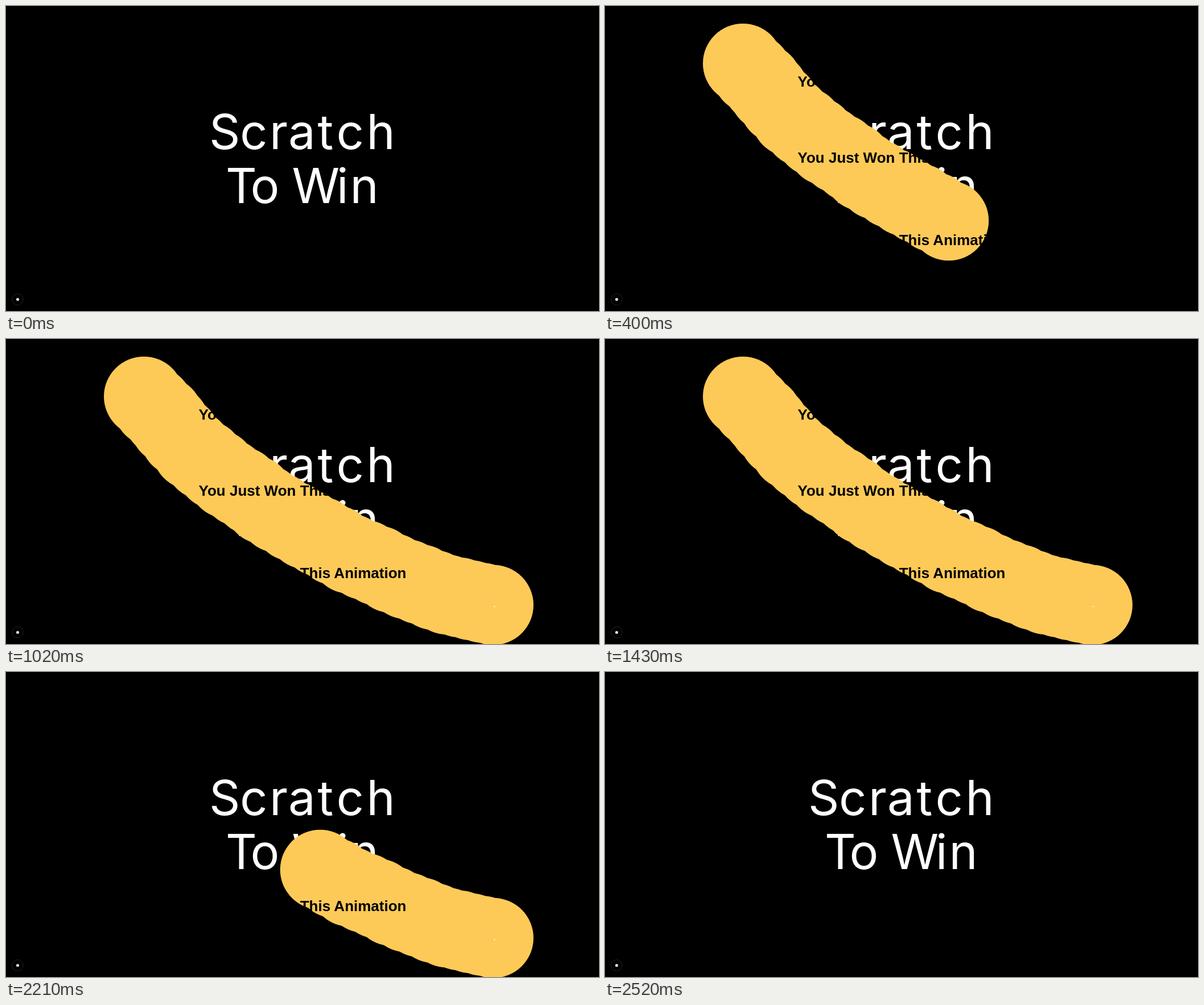
An HTML page without scripts for the animation above (3.27 s loop, 1042 by 537 pixels).

```html
<!DOCTYPE html>
<html lang="en">
<head>
<meta charset="utf-8">
<title>Scratch To Win</title>
<style>
  html, body { margin: 0; width: 100%; height: 100%; overflow: hidden; background: #000; }
  svg { display: block; width: 100%; height: 100%; }

  .title { font: 400 85px Inter, sans-serif; fill: #fff; }
  .prize { font: 700 26px "Liberation Sans", Arial, sans-serif; text-anchor: middle; }

  /* Each stamp shows at its own delay --t and wears off 1850 ms later. */
  .trail > * {
    opacity: 0;
    animation: stamp 3270ms calc(var(--t) * 1ms) infinite;
  }
  .trail circle { r: 70.3px; fill: #fdca58; }
  .trail .cursor { fill: #fff; }
  @keyframes stamp {
    0%, 56.57% { opacity: 1; }
    56.58%, 100% { opacity: 0; }
  }
</style>
</head>
<body>
<svg viewBox="0 0 1042 537">
  <g class="title">
    <text y="251.5" x="357 411 463 496 547.5 580.5 633.5">Scratch</text>
    <text y="347"><tspan x="386 429.5">To</tspan> <tspan x="502.5 581 604.5">Win</tspan></text>
  </g>

  <circle cx="20.5" cy="516.5" r="9.8" fill="#000" stroke="#242424"/>
  <circle cx="20.5" cy="516.5" r="2.6" fill="#ddd"/>

  <g class="trail">
    <circle cx="242.3" cy="101.2" style="--t:88"/>
    <circle cx="259" cy="119" style="--t:140"/>
    <circle cx="276.2" cy="136.3" style="--t:172"/>
    <circle cx="288" cy="151" style="--t:184"/>
    <circle cx="306" cy="172" style="--t:196"/>
    <circle cx="327" cy="195" style="--t:207"/>
    <circle cx="349" cy="213" style="--t:218"/>
    <circle cx="370" cy="230" style="--t:229"/>
    <circle cx="390" cy="246" style="--t:240"/>
    <circle cx="412" cy="260" style="--t:258"/>
    <circle cx="434" cy="275" style="--t:290"/>
    <circle cx="454" cy="291" style="--t:318"/>
    <circle cx="478" cy="306" style="--t:332"/>
    <circle cx="504" cy="321" style="--t:342"/>
    <circle cx="528" cy="335" style="--t:350"/>
    <circle cx="552" cy="348" style="--t:365"/>
    <circle cx="578" cy="363" style="--t:383"/>
    <circle cx="604" cy="378" style="--t:401"/>
    <circle cx="630" cy="389" style="--t:419"/>
    <circle cx="653" cy="399" style="--t:437"/>
    <circle cx="678" cy="412" style="--t:455"/>
    <circle cx="704" cy="423" style="--t:473"/>
    <circle cx="728" cy="432" style="--t:491"/>
    <circle cx="752" cy="442" style="--t:509"/>
    <circle cx="775" cy="450" style="--t:525"/>
    <circle cx="797" cy="455" style="--t:540"/>
    <circle cx="817" cy="460" style="--t:552"/>
    <circle cx="837" cy="464.5" style="--t:585"/>
    <circle cx="854.4" cy="468" style="--t:608"/>
    <circle cx="856.6" cy="468.3" style="--t:640"/>
    <path class="cursor" d="M857.5 468.5v4l2-1z" style="--t:641"/>
  </g>

  <!-- Black on black: readable only where the trail lies behind it. -->
  <g class="prize">
    <text x="521" y="141.5">You Just Won This Animation</text>
    <text x="521" y="276">You Just Won This Animation</text>
    <text x="521" y="420.5">You Just Won This Animation</text>
  </g>
</svg>
</body>
</html>
```
